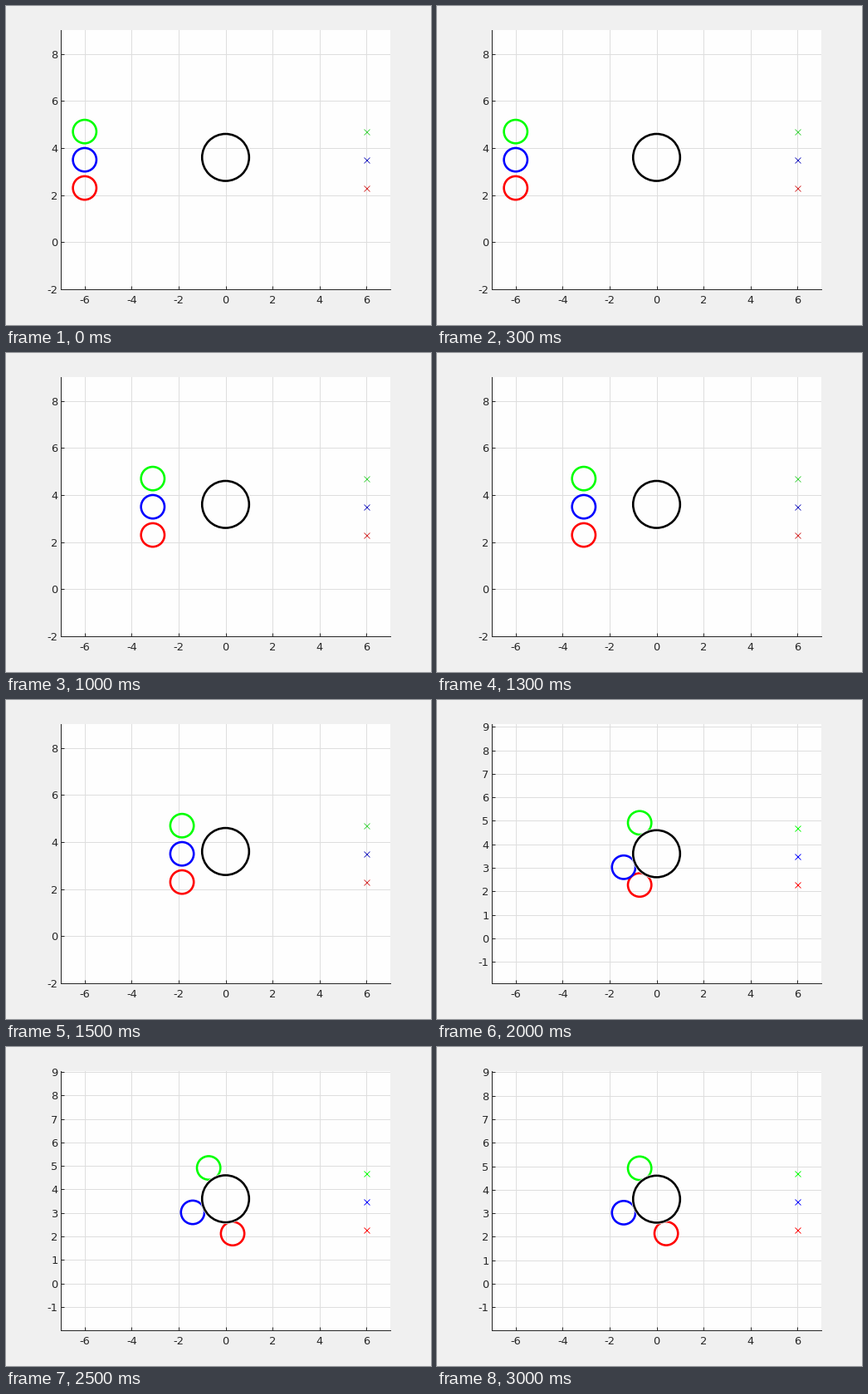
A matplotlib script for the animation above (3500 ms loop, 512x384 px).

```python
import matplotlib.pyplot as plt
from matplotlib.animation import FuncAnimation
from matplotlib.patches import Circle
from matplotlib.patheffects import withStroke
from matplotlib.ticker import FuncFormatter, MultipleLocator

W, H, DPI = 512, 384, 72          # at 72 dpi one point is one pixel
STEPS, STEP_MS = 7, 500
LEFT, BOTTOM, AX_W, AX_H = 66.48, 43, 396.1, 312
X_SPAN = 14
Y_SPAN = X_SPAN * AX_H / AX_W     # equal units on both axes
INK = "#262626"

START_X = [-6, -4.47, -3.1, -1.855]               # shared approach to the obstacle
GOALS = {"red": 2.3, "blue": 3.5, "green": 4.7}   # height of each lane
RGB = {"red": "#ff0000", "blue": "#0000ff", "green": "#00ff00"}
SOFT = {"red": "#d42a2a", "blue": "#2020c0", "green": "#3cd23c"}

# resting places around the obstacle once the robots reach it
BLOCKED = {
    "red": [(-0.72, 2.27), (0.3, 2.12), (0.41, 2.14)],
    "blue": [(-1.4, 3.025)] * 3,
    "green": [(-0.72, 4.915)] * 3,
}
Y_LOW = [-2.01] * 3 + [-2.007, -1.912, -1.993, -1.979]

plt.rcParams["font.family"] = "DejaVu Sans"
fig = plt.figure(figsize=(W / DPI, H / DPI), dpi=DPI, facecolor="#f0f0f0")
ax = fig.add_axes([LEFT / W, BOTTOM / H, AX_W / W, AX_H / H], facecolor="#fefefe")
ax.set_xlim(-X_SPAN / 2, X_SPAN / 2)
ax.set_axisbelow(True)
ax.grid(color="#dedede", linewidth=1)
for side in ("top", "right"):
    ax.spines[side].set_visible(False)
for side in ("left", "bottom"):
    ax.spines[side].set(color=INK, linewidth=1)
ax.tick_params(direction="in", length=4, width=1, color=INK,
               labelcolor=INK, labelsize=13)
ax.tick_params(axis="x", pad=7)
ax.tick_params(axis="y", pad=4)
ax.xaxis.set_major_locator(MultipleLocator(2))
for axis in (ax.xaxis, ax.yaxis):
    axis.set_major_formatter(FuncFormatter(lambda v, _: f"{round(v)}"))


def ring(center, radius, color, z):
    patch = Circle(center, radius, fill=False, edgecolor=color, linewidth=2.6, zorder=z)
    ax.add_patch(patch)
    return patch


robots = {name: ring((START_X[0], y), 0.5, RGB[name], 3) for name, y in GOALS.items()}
obstacle = ring((0, 3.6), 1, "black", 4)
obstacle.set_path_effects([withStroke(linewidth=4, foreground="#fefefe")])
marks = {
    name: ax.plot([6], [y], "x", color=SOFT[name], markersize=7, markeredgewidth=0.9)[0]
    for name, y in GOALS.items()
}


def position(name, step):
    if step < len(START_X):
        return START_X[step], GOALS[name]
    return BLOCKED[name][step - len(START_X)]


def update(step):
    blocked = step >= len(START_X)
    ax.set_ylim(Y_LOW[step], Y_LOW[step] + Y_SPAN)
    ax.yaxis.set_major_locator(MultipleLocator(1 if blocked else 2))
    for name, robot in robots.items():
        robot.center = position(name, step)
        marks[name].set_color((RGB if blocked else SOFT)[name])
    return [*robots.values(), *marks.values(), obstacle]


anim = FuncAnimation(fig, update, frames=STEPS, interval=STEP_MS,
                     init_func=lambda: update(0), repeat=True, repeat_delay=0, blit=False)
plt.show()
```
